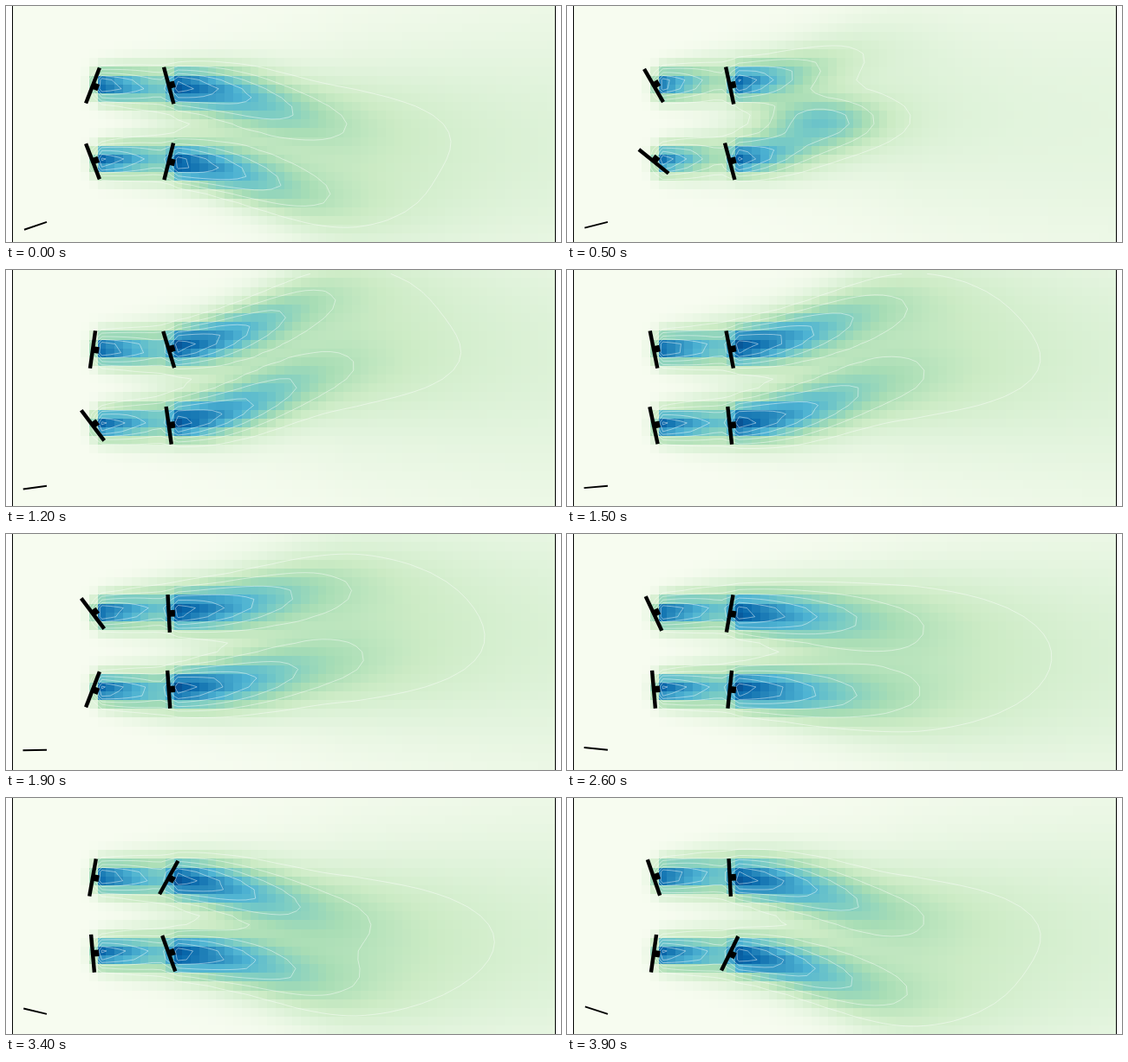
Recreate the animation shown at these times as an HTML page with a canvas. Size 640 px wide and 273 px high, loop 4 s.

```html
<!DOCTYPE html>
<html lang="en">
<head>
<meta charset="utf-8">
<title>Wind farm wakes</title>
<style>
html, body { margin: 0; width: 100%; height: 100%; overflow: hidden; background: #fff; }
canvas { display: block; }
</style>
</head>
<body>
<canvas id="stage" width="640" height="273"></canvas>
<script>
const ctx = document.getElementById('stage').getContext('2d');
const LOOP = 4000, STEP = 100;
const COLS = 64, ROWS = 27, LEFT = 8, TOP = -0.7, CELL_W = 9.77, CELL_H = 10.15;
const FIRST_LEVEL = 0.2, LEVEL_GAP = 0.13;
const PALETTE = '#f7fcf0 #e0f3db #ccebc5 #a8ddb5 #7bccc4 #4eb3d3 #2b8cbe #0868ac #084081'
  .split(' ').map(hex => [1, 3, 5].map(i => parseInt(hex.slice(i, i + 2), 16)));

// Each rotor steers through a few poses, in degrees from upright.
const POSE_TIMES = [0, 500, 1200, 1900, 2600, 3400, 3900];
const TURBINES = [
  { x: 100, y: 92, yaw: [21, -30, 8, -37, -25, 10, -19] },
  { x: 187.7, y: 92, yaw: [-15, -12, -17, -3, 10, 29, -3] },
  { x: 100, y: 179.8, yaw: [-21, -51, -37, 21, -5, -5, 8] },
  { x: 187.7, y: 179.8, yaw: [14, -15, -8, -4, 6, -20, 26] }
];

const clamp = (v, lo, hi) => Math.min(hi, Math.max(lo, v));
const mix = (a, b, p) => a + (b - a) * p;
const rad = deg => deg * Math.PI / 180;
const bell = (d, s) => Math.exp(-d * d / (2 * s * s));
const edgeX = c => Math.round(LEFT + c * CELL_W);
const edgeY = r => Math.round(TOP + r * CELL_H);
const midX = c => LEFT + (c + 0.5) * CELL_W;
const midY = r => TOP + (r + 0.5) * CELL_H;

function yawAt(poses, t) {
  const next = Math.max(1, POSE_TIMES.findIndex(time => time >= t));
  const from = POSE_TIMES[next - 1];
  return mix(poses[next - 1], poses[next], (t - from) / (POSE_TIMES[next] - from));
}

function shade(v) {
  const s = clamp(v, 0, 1) * (PALETTE.length - 1);
  const i = Math.min(PALETTE.length - 2, Math.floor(s));
  return `rgb(${PALETTE[i].map((a, k) => Math.round(mix(a, PALETTE[i + 1][k], s - i)))})`;
}

// The wakes swing up quickly, sink back slowly, and break up early in the loop.
function flowAt(t) {
  const breakup = bell(t - 550, 300);
  return {
    bend: -6 + 36 * Math.cos(2 * Math.PI * Math.sqrt(t / LOOP)),
    reach: 130 - 55 * breakup,
    eddy: 0.42 * breakup
  };
}

function wake(rotor, flow, x, y) {
  const d = x - rotor.x;
  if (d < -12) return 0;
  const run = Math.max(0, d);
  const onset = Math.min(1, (d + 12) / 22) ** 1.5;
  const u = Math.max(0, x - 110) / 210;
  const drift = flow.bend * 1.7 * Math.tanh(u ** 3 / 1.7);
  const tilt = 0.002 * clamp(rotor.yaw, -30, 30) * Math.min(run, 100);
  const strength = 0.97 * onset * Math.exp(-run / flow.reach);
  return strength * bell(y - rotor.y + 0.8 - drift - tilt, 11.5 + 0.1 * run);
}

function deficit(rotors, flow, x, y) {
  const haze = 0.1 * clamp((x - 170) / 230, 0, 1) * bell(y - 138, 40 + 0.16 * Math.max(0, x - 100));
  const eddy = flow.eddy * bell(x - 288, 48) * bell(y - 130, 20);
  return 1 - rotors.reduce((calm, rotor) => calm * (1 - wake(rotor, flow, x, y)),
    (1 - haze) * (1 - eddy));
}

function buildField(rotors, flow) {
  return Array.from({ length: ROWS }, (_, r) =>
    Array.from({ length: COLS }, (_, c) => deficit(rotors, flow, midX(c), midY(r))));
}

function drawCells(field) {
  field.forEach((row, r) => row.forEach((v, c) => {
    ctx.fillStyle = shade(v);
    ctx.fillRect(edgeX(c), edgeY(r), edgeX(c + 1) - edgeX(c), edgeY(r + 1) - edgeY(r));
  }));
}

function drawContour(field, level) {
  ctx.beginPath();
  for (let r = 0; r < ROWS - 1; r++) {
    for (let c = 0; c < COLS - 1; c++) {
      const corners = [[c, r], [c + 1, r], [c + 1, r + 1], [c, r + 1]];
      const hits = [];
      corners.forEach(([ac, ar], i) => {
        const [bc, br] = corners[(i + 1) % 4];
        const a = field[ar][ac], b = field[br][bc];
        if ((a < level) === (b < level)) return;
        const p = (level - a) / (b - a);
        hits.push([midX(mix(ac, bc, p)), midY(mix(ar, br, p))]);
      });
      for (let i = 0; i < hits.length; i += 2) {
        ctx.moveTo(...hits[i]);
        ctx.lineTo(...hits[i + 1]);
      }
    }
  }
  ctx.stroke();
}

function drawRotor({ x, y, yaw }) {
  ctx.save();
  ctx.translate(x, y);
  ctx.rotate(rad(yaw));
  ctx.fillRect(-2.2, -22, 4.4, 44);
  ctx.fillRect(0, -3.8, 7.2, 7.6);
  ctx.restore();
}

function drawWind(t) {
  const angle = rad(mix(-19, 19, t / LOOP));
  ctx.lineWidth = 1.9;
  ctx.beginPath();
  ctx.moveTo(47 - 27.5 * Math.cos(angle), 249.8 - 27.5 * Math.sin(angle));
  ctx.lineTo(47, 249.8);
  ctx.stroke();
}

function render(t) {
  const rotors = TURBINES.map(({ x, y, yaw }) => ({ x, y, yaw: yawAt(yaw, t) }));
  const field = buildField(rotors, flowAt(t));
  ctx.fillStyle = '#fff';
  ctx.fillRect(0, 0, 640, 273);
  drawCells(field);
  ctx.strokeStyle = 'rgba(255,255,255,0.45)';
  ctx.lineWidth = 1;
  for (let level = FIRST_LEVEL; level < 1; level += LEVEL_GAP) drawContour(field, level);
  ctx.fillStyle = ctx.strokeStyle = '#000';
  rotors.forEach(drawRotor);
  drawWind(t);
  ctx.fillRect(7, 0, 1, 273);
  ctx.fillRect(633, 0, 1, 273);
}

let shown = -1;
function tick() {
  const t = Math.floor(performance.now() % LOOP / STEP) * STEP;
  if (t !== shown) render(shown = t);
  requestAnimationFrame(tick);
}
tick();
</script>
</body>
</html>
```
